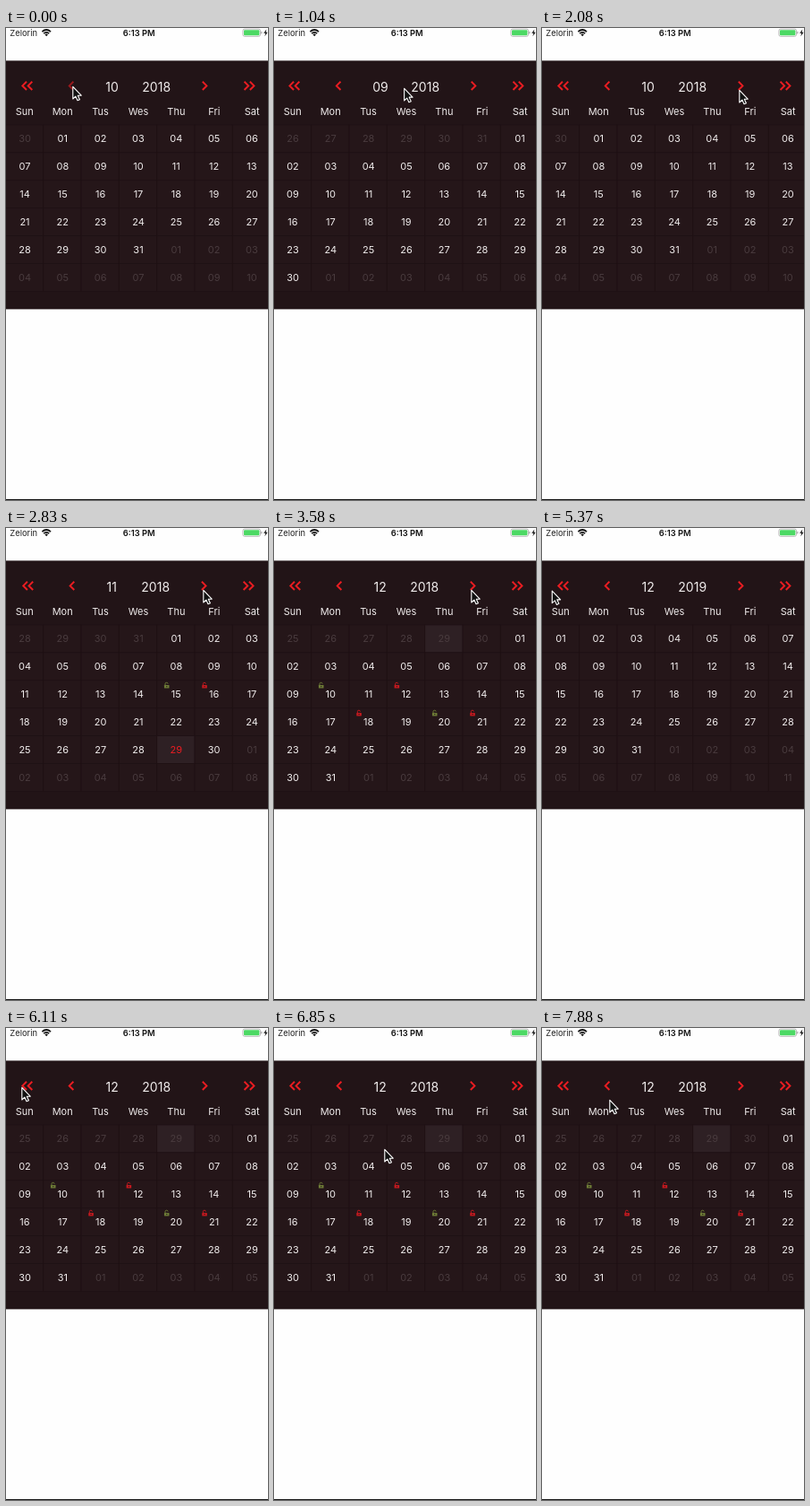
An HTML page that plays this animation: 293x526 px, repeating every 8 s.

```html
<!DOCTYPE html>
<html lang="en">
<head>
<meta charset="utf-8">
<title>Calendar</title>
<style>
html, body { margin: 0; width: 100%; height: 100%; overflow: hidden; background: #fefefe; }
svg { display: block; width: 293px; height: 526px; font-family: Inter, "Open Sans", sans-serif; }
</style>
</head>
<body>
<svg id="stage" viewBox="0 0 293 526"></svg>
<script>
const LOOP = 8000, STEP = 148.7; // the picture is refreshed once per STEP
const PITCH_X = 42.33, PITCH_Y = 30.9, GRID_TOP = 108;
const RED = '#e91d22', LOCK_RED = '#c3191f', GREEN = '#6d7b36', WHITE = '#f0ecec', DIM = '#493b3e';
const CELL = '#251619', TODAY = '#2e2024';
const stage = document.getElementById('stage');

function add(parent, tag, attrs, text) {
  const el = document.createElementNS('http://www.w3.org/2000/svg', tag);
  for (const k in attrs) el.setAttribute(k, attrs[k]);
  if (text !== undefined) el.textContent = text;
  parent.appendChild(el);
  return el;
}
const rect = (p, x, y, width, height, fill, more) =>
  add(p, 'rect', { x, y, width, height, fill, ...more });
const label = (p, x, y, size, fill, text, more) =>
  add(p, 'text', { x, y, 'font-size': size, fill, 'text-anchor': 'middle', ...more }, text);
const move = (el, x, y) => el.setAttribute('transform', `translate(${x} ${y})`);
const pad = n => String(n).padStart(2, '0');

// Status bar
label(stage, 4.3, 8.6, 9.4, '#222', 'Zelorin', { 'text-anchor': 'start' });
label(stage, 148.8, 8.6, 9.4, '#111', '6:13 PM', { 'font-weight': 600 });
const wifi = add(stage, 'g', { fill: 'none', stroke: '#111', 'stroke-width': 1.7 });
add(wifi, 'path', { d: 'M40.4 4.2Q45.2 -.2 50 4.2M42.2 6.2Q45.2 3.5 48.2 6.2' });
add(wifi, 'path', { d: 'M43.4 7.3Q45.2 5.9 47 7.3L45.2 9.2z', fill: '#111', stroke: 'none' });
rect(stage, 264.9, 1.1, 19.6, 8.2, 'none', { rx: 2, stroke: '#a9a9a9', 'stroke-width': .8 });
rect(stage, 266, 2.2, 17.4, 6, '#4cd964', { rx: 1 });
rect(stage, 285.2, 3.8, 1.2, 2.8, '#a9a9a9', { rx: .6 });
add(stage, 'path', { d: 'M291.3 1.5L288.2 5.8H290.2L289.4 9.2L292.6 4.7H290.6z', fill: '#111' });
rect(stage, 0, 525, 293, 1, '#1a1a1a');

// Calendar panel
rect(stage, 0, 36.4, 293, 277, '#221417');
['Sun', 'Mon', 'Tus', 'Wes', 'Thu', 'Fri', 'Sat'].forEach((d, i) =>
  label(stage, 20.8 + i * 42.4, 97.3, 11, WHITE, d));

const cells = Array.from({ length: 42 }, (_, i) => {
  const x = (i % 7) * PITCH_X - .6, y = GRID_TOP + Math.floor(i / 7) * PITCH_Y;
  const box = rect(stage, x, y, PITCH_X, PITCH_Y, CELL, { stroke: '#1f1114', 'stroke-width': .8 });
  const num = label(stage, x + 21.6, y + 19.4, 11, WHITE, '');
  const lock = add(stage, 'g', {});
  move(lock, x + 8.2, y + 1.8);
  rect(lock, 0, 3.4, 5.6, 3.6, 'currentColor', { rx: .4 });
  add(lock, 'path', { d: 'M1.1 3.6V2Q1.1 .7 2.6 .7T4.2 2', fill: 'none', stroke: 'currentColor' });
  rect(lock, 2.2, 4.6, 1.3, 1, CELL);
  return { box, num, lock };
});

// Header
const month = label(stage, 0, 70.9, 14, WHITE, '');
const year = label(stage, 0, 70.9, 14, WHITE, '');
function arrow(x, dir, count, months) {
  const g = add(stage, 'g', { fill: 'none', stroke: RED, 'stroke-width': 2 });
  for (let i = 0; i < count; i++)
    add(g, 'path', { d: `M${x + dir * 6.3 * i} 59.8l${dir * 4.6} 4.6l${-dir * 4.6} 4.6` });
  return { g, dir, months };
}
const prevYear = arrow(29.3, -1, 2, -12), prev = arrow(75.4, -1, 1, -1);
const next = arrow(219.8, 1, 1, 1), nextYear = arrow(266.5, 1, 2, 12);
const arrows = [prevYear, prev, next, nextYear];

const cursor = add(stage, 'path', {
  d: 'M.8 1V14.6L3.9 11.8L6 16.4L8.4 15.3L6.3 10.8H10.2z',
  fill: '#111', stroke: '#fff', 'stroke-width': 1.1, 'stroke-linejoin': 'round'
});

// Taps: button, step pressed, step released
const taps = [[prev, 0, 5], [next, 12, 14], [next, 17, 19], [next, 22, 24],
  [nextYear, 32, 32], [prevYear, 39, 41]];

// Cursor stops: step, x, y
const stops = [[0, 74, 65], [5, 74, 65], [10, 220, 69], [26, 220, 69], [29, 273, 66], [32, 273, 66],
  [35, 1, 75], [37, 17, 66], [44, 17, 66], [46, 123, 135], [47, 125, 141], [52, 74, 67], [53, 75, 80]];

const locks = {
  '2018-11': { open: [15], shut: [16] },
  '2018-12': { open: [10, 20], shut: [12, 18, 21] }
};

const ease = p => 1 - (1 - p) ** 1.3;

function cursorAt(step) {
  const i = stops.findIndex(s => s[0] > step);
  if (i < 0) return stops[stops.length - 1].slice(1);
  const [t0, x0, y0] = stops[i - 1], [t1, x1, y1] = stops[i];
  const p = ease((step - t0) / (t1 - t0));
  return [x0 + (x1 - x0) * p, y0 + (y1 - y0) * p];
}

function showMonth(y, m) {
  const first = new Date(y, m - 1, 1).getDay();
  const { open = [], shut = [] } = locks[y + '-' + m] || {};
  cells.forEach((c, i) => {
    const date = new Date(y, m - 1, 1 - first + i), day = date.getDate();
    const inside = date.getMonth() === m - 1;
    const today = date.getFullYear() === 2018 && date.getMonth() === 10 && day === 29;
    const locked = inside && (open.includes(day) || shut.includes(day));
    c.num.textContent = pad(day);
    c.num.setAttribute('fill', !inside ? DIM : today ? RED : WHITE);
    c.box.setAttribute('fill', today ? TODAY : CELL);
    c.lock.setAttribute('color', open.includes(day) ? GREEN : LOCK_RED);
    c.lock.setAttribute('display', locked ? 'inline' : 'none');
  });
  month.textContent = pad(m);
  year.textContent = y;
  // The header spreads with the month's width: every "1" is a narrow digit
  const spread = 1 - pad(m).split('1').length + 1;
  month.setAttribute('x', 118.6 + spread * .4);
  year.setAttribute('x', 168.2 + spread);
  for (const a of arrows) move(a.g, a.dir * spread * .9, 0);
}

let shown;
function draw(t) {
  const step = Math.floor((t + 5) / STEP);
  const months = taps.reduce((sum, [a, , up]) => sum + (step >= up ? a.months : 0), 2018 * 12 + 9);
  if (months !== shown) showMonth(Math.floor(months / 12), months % 12 + 1);
  shown = months;
  for (const a of arrows) {
    const held = taps.some(([b, down, up]) => a === b && step >= down && step < up);
    a.g.setAttribute('opacity', held ? .6 : 1);
  }
  const [x, y] = cursorAt(step);
  move(cursor, x, y - .6);
}

const start = performance.now();
function tick() {
  draw((performance.now() - start) % LOOP);
  requestAnimationFrame(tick);
}
tick();
</script>
</body>
</html>
```
